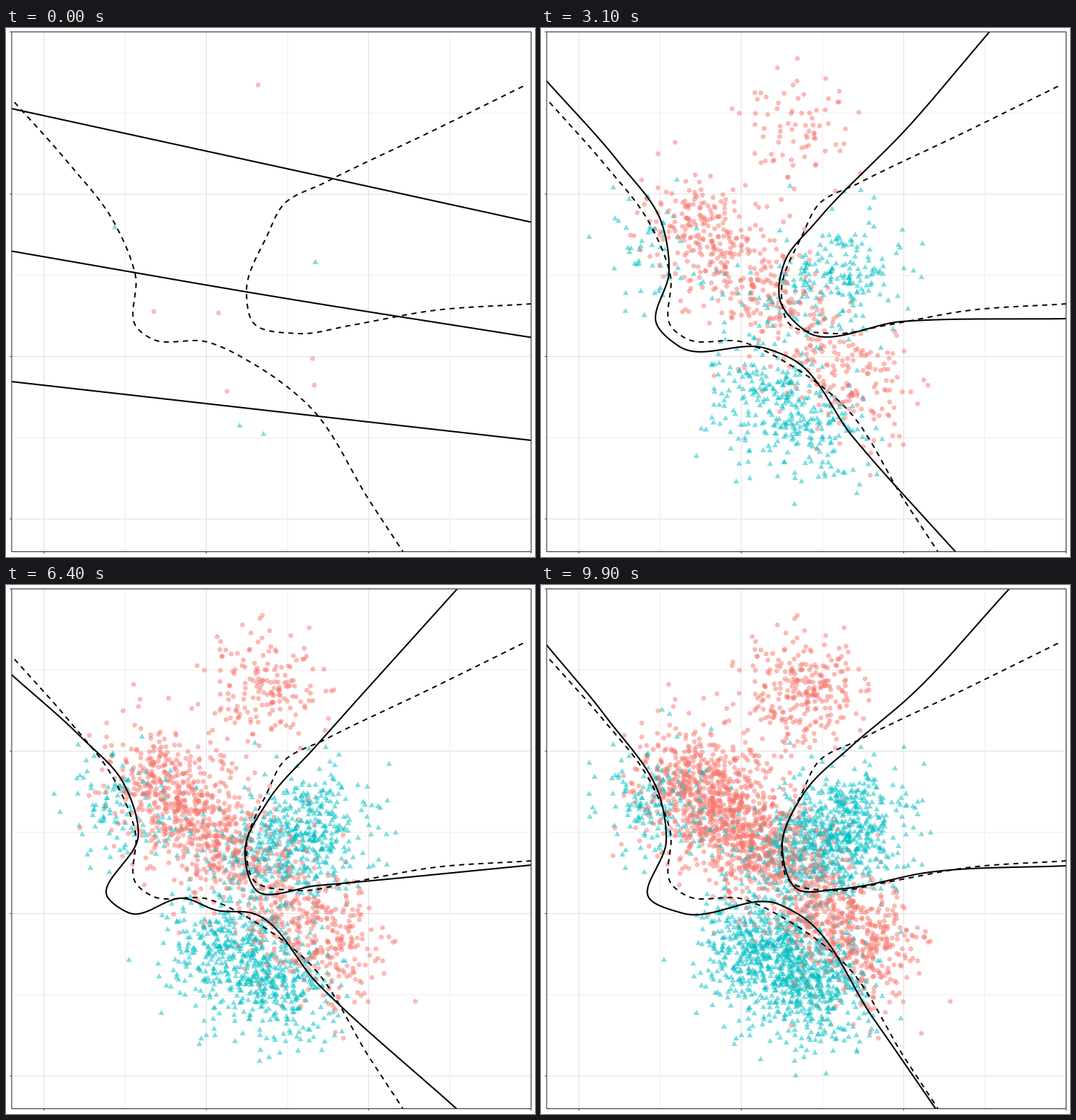
Recreate the animation shown at these times as a matplotlib script. Size 748 px wide and 748 px high, loop 10 s.

```python
import numpy as np
import matplotlib.pyplot as plt
from matplotlib.animation import FuncAnimation
from matplotlib.collections import PathCollection
from matplotlib.patches import Rectangle
from matplotlib.path import Path

SIZE, DPI = 748, 100
PX = 72 / DPI
FRAMES, INTERVAL = 100, 100
FIRST, STEP = 10, 40            # samples at the start, and added per frame
TOTAL = FIRST + STEP * (FRAMES - 1)
X0, X1, Y0, Y1 = 8, 742.5, 5.5, 740.5
GRID = 229.6
RED, TEAL = (0.973, 0.463, 0.427, 0.5), (0, 0.749, 0.769, 0.5)

fig = plt.figure(figsize=(SIZE / DPI, SIZE / DPI), dpi=DPI, facecolor="white")
ax = fig.add_axes([0, 0, 1, 1])
ax.set_xlim(0, SIZE)
ax.set_ylim(SIZE, 0)
ax.axis("off")


def rule(xs, ys, color, z=0):
    ax.plot(xs, ys, color=color, lw=PX, zorder=z, snap=False,
            solid_capstyle="butt")


def draw_panel():
    for k in range(3):
        for shift, color in ((0, "#dedede"), (GRID / 2, "#ededed")):
            x, y = 53.6 + GRID * k + shift, 694.2 - GRID * k - shift
            rule([x, x], [Y0, Y1], color)
            rule([X0, X1], [y, y], color)
    for k in range(4):
        x, y = 53.6 + GRID * k, 694.2 - GRID * k
        rule([x, x], [Y1, Y1 + 2.5], "#333333", z=6)
        rule([X0 - 2.5, X0], [y, y], "#333333", z=6)
    ax.add_patch(Rectangle((X0, Y0), X1 - X0, Y1 - Y0, fill=False, snap=False,
                           ec="#333333", lw=1.1 * PX, zorder=6))


def smooth(pts, n=240):
    """Cubic through pts, resampled evenly along its length."""
    p = np.array(pts, float)
    t = np.r_[0, np.cumsum(np.hypot(*np.diff(p, axis=0).T))]
    m = np.gradient(p, t, axis=0)
    u = np.linspace(0, t[-1], 1500)
    i = np.clip(np.searchsorted(t, u, side="right") - 1, 0, len(t) - 2)
    h = (t[i + 1] - t[i])[:, None]
    s = (u - t[i])[:, None] / h
    c = ((2 * s**3 - 3 * s**2 + 1) * p[i] + (s**3 - 2 * s**2 + s) * h * m[i]
         + (3 * s**2 - 2 * s**3) * p[i + 1] + (s**3 - s**2) * h * m[i + 1])
    d = np.r_[0, np.cumsum(np.hypot(*np.diff(c, axis=0).T))]
    e = np.linspace(0, d[-1], n)
    return np.column_stack([np.interp(e, d, c[:, k]) for k in (0, 1)])


# Each class is a mixture of Gaussians; the opening samples are fixed
RED_MEANS = [(368, 148), (208, 278), (242, 315), (280, 342), (320, 375),
             (390, 450), (455, 515)]
TEAL_MEANS = [(165, 312), (450, 320), (425, 355), (400, 375), (350, 380),
              (290, 500), (315, 520), (340, 545), (375, 580), (400, 555)]
FIRST_RED = [(356.5, 80.5), (209, 401), (300.5, 403), (433.5, 467.5),
             (436, 505), (312.5, 513.5)]
FIRST_TEAL = [(154, 282), (437.5, 331.5), (330.5, 562.5), (364, 574.5)]


def make_samples(rng, spread=41):
    def mixture(means):
        return np.array(means)[rng.integers(len(means), size=TOTAL)]

    is_red = rng.random(TOTAL) < 0.5
    xy = np.where(is_red[:, None], mixture(RED_MEANS), mixture(TEAL_MEANS))
    xy = xy + rng.normal(0, spread, (TOTAL, 2))
    xy[:FIRST] = FIRST_RED + FIRST_TEAL
    is_red[:FIRST] = np.arange(FIRST) < len(FIRST_RED)
    return xy, is_red


def polygon(sides, radius):
    a = np.linspace(0, 2 * np.pi, sides + 1) - np.pi / 2
    return radius * np.column_stack([np.cos(a), np.sin(a)])


draw_panel()
disc, triangle = polygon(12, 3.5), polygon(3, 4.8)
xy, is_red = make_samples(np.random.default_rng(8))
marks = [Path(p + (disc if r else triangle)) for p, r in zip(xy, is_red)]
colors = np.where(is_red[:, None], RED, TEAL)
dots = PathCollection(marks[:FIRST], facecolors=colors[:FIRST],
                      edgecolors="none", zorder=2)
ax.add_collection(dots, autolim=False)

# True boundary
TRUE_LEFT = [(12, 105), (85, 187), (154, 277), (183, 350), (186, 425),
             (203, 438), (285, 444), (350, 475), (428, 534), (515, 670),
             (561, 740)]
TRUE_RIGHT = [(743, 390), (600, 400), (490, 420), (412, 432), (349, 416),
              (340, 375), (370, 292), (392, 250), (450, 219), (600, 147),
              (736, 80)]
for pts in (TRUE_LEFT, TRUE_RIGHT):
    ax.plot(*smooth(pts).T, color="black", lw=2 * PX, zorder=4,
            ls=(0, (3.6, 3.2)), dash_capstyle="butt")

# Fitted boundary: key poses, blended in between
poses = []


def pose(frame, left, right):
    poses.append((frame, smooth(left), smooth(right)))


pose(12,
     [(X0, 88), (110, 210), (164, 284), (174, 316), (138, 343), (160, 410),
      (245, 453), (318, 432), (365, 473), (460, 589), (589, Y1)],
     [(635, Y0), (420, 235), (355, 309), (330, 365), (348, 403), (420, 412),
      (X1, 428)])
pose(31,
     [(X0, 75), (110, 190), (170, 274), (181, 345), (164, 420), (195, 450),
      (318, 453), (355, 468), (440, 577), (586, Y1)],
     [(634, Y0), (520, 139), (390, 273), (344, 332), (338, 385), (375, 429),
      (510, 415), (X1, 411)])
pose(49,
     [(X0, 64), (110, 198), (172, 288), (184, 350), (126, 443), (150, 466),
      (315, 452), (355, 461), (440, 577), (548, Y1)],
     [(673, Y0), (530, 164), (440, 227), (357, 315), (340, 372), (373, 428),
      (470, 421), (565, 393), (X1, 395)])
pose(64,
     [(X0, 127), (105, 214), (166, 280), (187, 355), (144, 442), (175, 464),
      (252, 443), (298, 460), (348, 464), (440, 563), (637, Y1)],
     [(638, Y0), (440, 226), (370, 306), (338, 375), (354, 432), (440, 425),
      (X1, 396)])
pose(78,
     [(X0, 91), (110, 207), (168, 286), (179, 355), (146, 440), (175, 468),
      (290, 446), (335, 471), (378, 485), (430, 552), (588, Y1)],
     [(616, Y0), (510, 130), (395, 277), (335, 380), (353, 409), (395, 432),
      (500, 416), (X1, 408)])
pose(99,
     [(X0, 85), (90, 184), (170, 306), (177, 363), (153, 443), (200, 464),
      (335, 451), (363, 465), (470, 613), (558, Y1)],
     [(662, Y0), (520, 159), (440, 227), (372, 294), (341, 370), (362, 430),
      (420, 430), (550, 406), (X1, 397)])

START = [smooth([(X0, a), (375, b), (X1, c)]) for a, b, c in
         ((114, 194, 274.5), (315.5, 379, 437.5), (500, 541.5, 583))]

clip = Rectangle((X0, Y0), X1 - X0, Y1 - Y0, transform=ax.transData)
fits = [ax.plot([], [], color="black", lw=2.1 * PX, zorder=5)[0]
        for _ in START]
for line in fits:
    line.set_clip_path(clip)

s = np.linspace(0, 1, 240)[:, None]


def fitted(frame):
    """Blend of the neighbouring poses, with the wobble of each new fit."""
    if frame == 0:
        return START
    rng = np.random.default_rng(frame)
    k = int(np.searchsorted([p[0] for p in poses], frame))
    end, *after = poses[k]
    begin, *before = poses[k - 1] if k else (0, *after)
    u = (frame - begin) / (end - begin)
    amp = np.sin(np.pi * u) * (2.5 if k else 7)
    curves = []
    for p, q in zip(before, after):
        wobble = sum(rng.normal(0, 1 / m, 2) * np.sin(m * np.pi * s)
                     for m in range(1, 6))
        curves.append(p + (q - p) * u + amp * wobble)
    return curves + [np.empty((0, 2))]


def update(frame):
    n = FIRST + STEP * frame
    dots.set_paths(marks[:n])
    dots.set_facecolor(colors[:n])
    for line, c in zip(fits, fitted(frame)):
        line.set_data(c[:, 0], c[:, 1])
    return [dots, *fits]


anim = FuncAnimation(fig, update, frames=FRAMES, interval=INTERVAL,
                     repeat=True, cache_frame_data=False)
plt.show()
```
